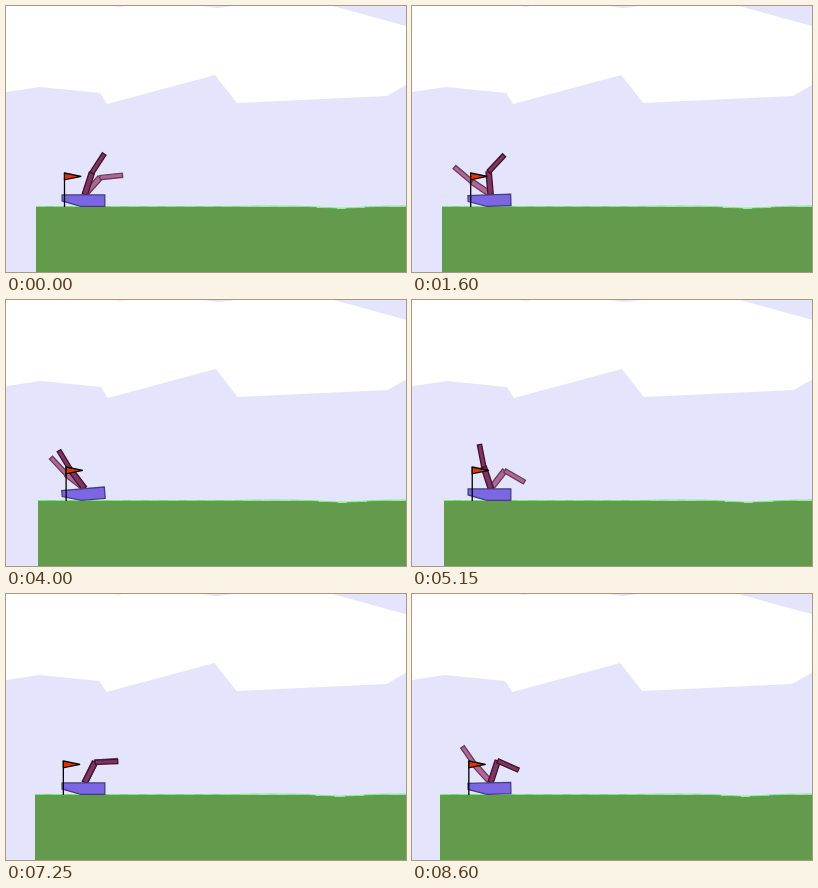
Write an HTML page that moves like this. It is 400 by 266 pixels and loops after 8.65 s.

```html
<!DOCTYPE html>
<html lang="en">
<head>
<meta charset="utf-8">
<title>Overturned walker</title>
<style>
  html, body { margin: 0; width: 100%; height: 100%; overflow: hidden; background: #e4e4fc; }
  svg { display: block; width: 400px; height: 266px; }
  .light { fill: #b06698; stroke: #6a3c56; }
  .dark { fill: #7e3464; stroke: #401428; }
  .hull { fill: #7c66e4; stroke: #40407c; }
  .flag { fill: #e43400; stroke: #000; }
</style>
</head>
<body>
<svg viewBox="0 0 400 266">
  <path id="clouds" fill="#fff" d="M-20 0H108L113 1L119 0H196L211 2L229 0H327L400 20L420 25V67L400 79L381 90L231 97L209 69L101 98L94 87L34 81L0 86L-20 89Z"/>
  <g id="ground" fill="none"></g>
  <g id="walker" stroke-width="1.3"></g>
  <g id="marker" stroke-width="1.3">
    <path d="M28.5 167V201" stroke="#000"/>
    <path class="flag" d="M28.5 167L45.2 170.4L28.5 173.8Z"/>
  </g>
</svg>
<script>
const LOOP = 8650, STEP = 50, FLOOR = 200.9, HULL_X = 78.8, LEG = 22.67, TILE = 28 / 3;
const HULL = [[20, 6], [-4, 6], [-22.67, 0.67], [-22.67, -5.33], [20, -5.33]];
const HIP = 5.8; // from the hull's centre up to the joint

// Key poses: time, then thigh and shin of each leg in degrees from upright
const POSES = [
  [0, 42, 84, 18, 33],
  [1600, -56, -50, -5, 43],
  [2750, -28, 18, -74, -31],
  [4000, -52, -43, -37, -31],
  [5150, 38, 120, -18, -11],
  [7250, 26, 86, 27, 88],
  [8600, -42, -35, 18, 114]
];

const $ = id => document.getElementById(id);
const rad = deg => deg * Math.PI / 180;
const place = (el, x, y, deg = 0) =>
  el.setAttribute("transform", `translate(${x} ${y}) rotate(${deg})`);

function add(parent, tag, attrs) {
  const el = document.createElementNS("http://www.w3.org/2000/svg", tag);
  for (const key in attrs) el.setAttribute(key, attrs[key]);
  return parent.appendChild(el);
}

// Leg angles, eased between the key poses
function legAngles(t) {
  const next = POSES.findIndex(pose => pose[0] > t);
  if (next < 0) return POSES[POSES.length - 1].slice(1);
  const [t0, ...from] = POSES[next - 1], [t1, ...to] = POSES[next];
  const k = (1 - Math.cos(Math.PI * (t - t0) / (t1 - t0))) / 2;
  return from.map((v, i) => v + (to[i] - v) * k);
}

// Legs thrown back to the left tip the hull over
const hullTilt = (light, dark) => Math.min(0, light) / 30 + Math.min(0, dark + 20) / 5.5;

// Left edge of the ground: still at first, then a slow sway
function groundLeft(t) {
  const sway = Math.PI * Math.max(0, t - 1500) / 5100;
  return 30 + 2 * Math.sin(sway) + 0.4 * Math.sin(3 * sway);
}

// Flat start, then a slight rise with one hollow in it
function groundHeight(x) {
  const rise = Math.min(1, Math.max(0, (x - 200) / 20));
  return FLOOR - 0.4 * rise + 2.1 * Math.exp(-(((x - 305) / 28) ** 2));
}

function buildGround() {
  const points = Array.from({ length: 45 }, (_, i) => [i * TILE, groundHeight(i * TILE)]);
  add($("ground"), "path", {
    d: `M0 270L${points.join("L")}V270Z`, fill: "#649a4c", "shape-rendering": "crispEdges"
  });
  points.slice(1).forEach((p, i) => add($("ground"), "path", {
    d: `M${points[i]}L${p}`, stroke: i % 2 ? "#4ce44c" : "#4cfc4c",
    "stroke-width": 0.8, transform: "translate(0 -0.4)"
  }));
}

const addLimb = (kind, width) =>
  add($("walker"), "rect", { class: kind, x: -width / 2, y: -LEG, width, height: LEG });

const legs = ["light", "dark"].map(kind => [addLimb(kind, 5.33), addLimb(kind, 4.27)]);
const hull = add($("walker"), "polygon", { class: "hull", points: HULL.join(" ") });
buildGround();

function draw(t) {
  const angles = legAngles(t);
  const tilt = hullTilt(angles[0], angles[2]);
  const s = Math.sin(rad(tilt)), c = Math.cos(rad(tilt));
  const hullY = FLOOR - 0.6 - Math.max(...HULL.map(([x, y]) => x * s + y * c));
  const hipX = HULL_X + HIP * s, hipY = hullY - HIP * c;
  place(hull, HULL_X, hullY, tilt);

  legs.forEach(([thigh, shin], i) => {
    const [a, b] = angles.slice(i * 2, i * 2 + 2);
    place(thigh, hipX, hipY, a);
    place(shin, hipX + LEG * Math.sin(rad(a)), hipY - LEG * Math.cos(rad(a)), b);
  });

  const left = groundLeft(t);
  place($("ground"), left, 0);
  place($("marker"), left, 0);
  place($("clouds"), (left - 30) / 2, 0); // farther away, so half as fast
}

const start = performance.now();
function tick() {
  const t = (performance.now() - start) % LOOP;
  draw(Math.floor(t / STEP) * STEP);
  requestAnimationFrame(tick);
}
tick();
</script>
</body>
</html>
```
